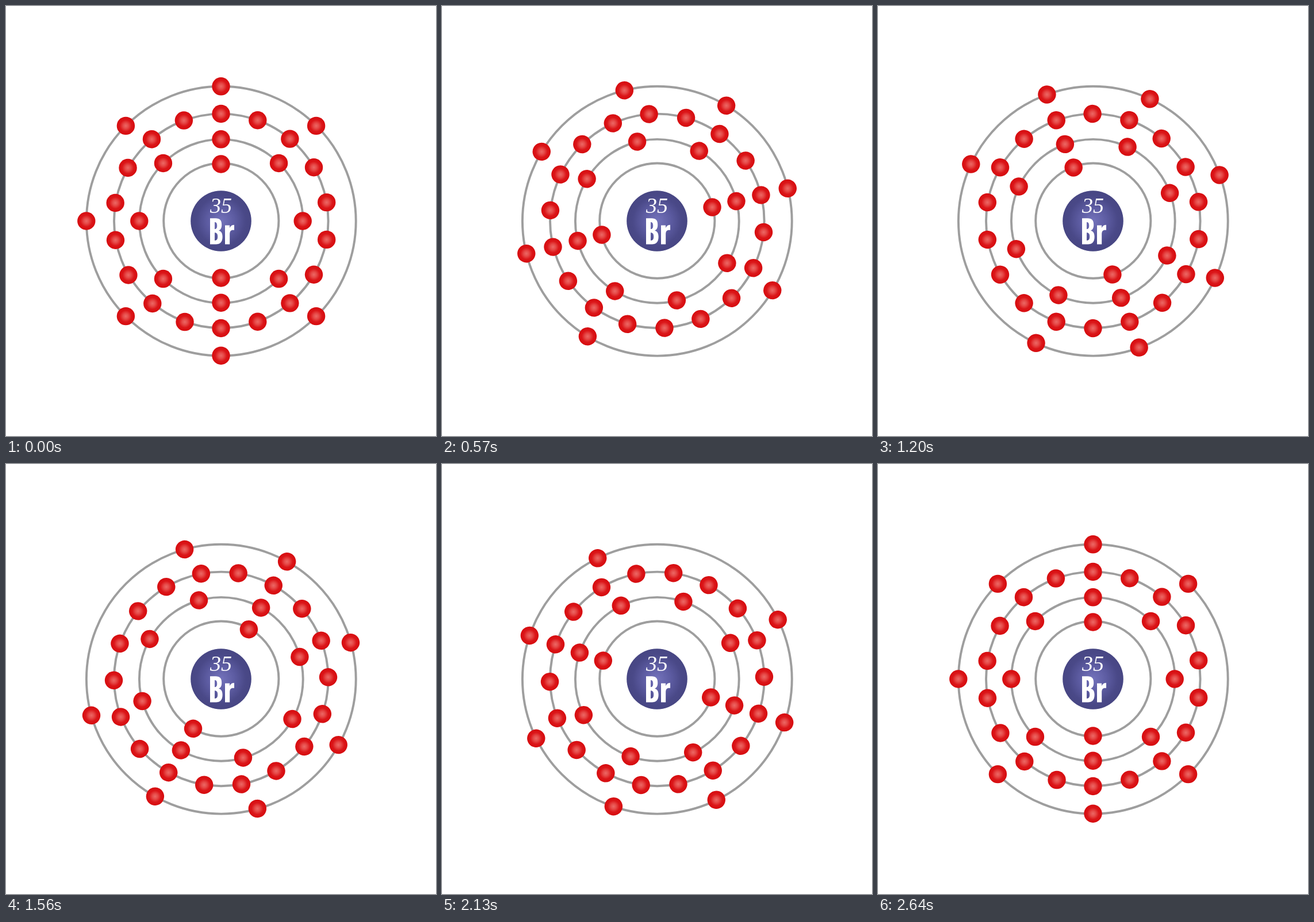
An HTML page that plays this animation: 748x748 px, repeating every 2670 ms.

```html
<!DOCTYPE html>
<html lang="en">
<head>
<meta charset="utf-8">
<title>Electron shells of bromine</title>
<style>
  html, body { margin: 0; width: 100%; height: 100%; overflow: hidden; background: #fff; }
  svg { display: block; width: 100%; height: 100%; }
  .orbit { fill: none; stroke: #9e9e9e; stroke-width: 3.9; }
  .number { font: italic 38px "Liberation Serif", "Times New Roman", serif; fill: #fff; text-anchor: middle; }
</style>
</head>
<body>
<svg viewBox="0 0 748 748">
  <defs>
    <radialGradient id="red">
      <stop offset="0" stop-color="#ec6865"/>
      <stop offset=".3" stop-color="#e64a48"/>
      <stop offset=".65" stop-color="#db1518"/>
      <stop offset="1" stop-color="#d60c0f"/>
    </radialGradient>
    <radialGradient id="blue">
      <stop offset="0" stop-color="#7473bb"/>
      <stop offset=".45" stop-color="#5d5ca2"/>
      <stop offset=".8" stop-color="#4a4988"/>
      <stop offset="1" stop-color="#474683"/>
    </radialGradient>
  </defs>
  <g id="orbits"></g>
  <g id="electrons"></g>
  <circle cx="374" cy="374" r="52.8" fill="url(#blue)"/>
  <text class="number" x="374" y="359.5">35</text>
  <!-- condensed lettering -->
  <g role="img" aria-label="Br" fill="#fff" fill-rule="evenodd">
    <path d="M355 369.3H364.5C372 369.3 375.2 373 375.2 380.5C375.2 386 373.6 389.3 370 390.6
      C374.6 392 376.6 395.6 376.6 401.6C376.6 410.5 372.8 414.6 365 414.6H355Z
      M363 376V388C366 388 367.2 386 367.2 382C367.2 378 366 376 363 376Z
      M363 394.3V407.9C366.8 407.9 368.2 405.6 368.2 401C368.2 396.6 366.8 394.3 363 394.3Z"/>
    <path d="M381 381.4H389V386C390.6 382.6 393.2 380.8 397 380.8V389.8
      C391.4 389 389.2 391.4 389.2 397V414.6H381Z"/>
  </g>
</svg>
<script>
const NS = "http://www.w3.org/2000/svg";
const C = 374, STEP = 30, LOOP = 2670, HALF = 45, LAST = 88;
const orbits = document.getElementById("orbits");
const electrons = document.getElementById("electrons");

// line: orbit radius, r: electron radius, n: slots
const shells = [
  { line: 100.1, cy: 373.6, r: 99, n: 2 },
  { line: 142.4, cy: 374.3, r: 142.2, n: 8 },
  { line: 186.3, cy: 373.9, r: 186.5, n: 18 },
  { line: 234.4, cy: 374.2, r: 234.2, n: 8, gap: 2 }
];

function circle(parent, attrs) {
  const el = document.createElementNS(NS, "circle");
  for (const key in attrs) el.setAttribute(key, attrs[key]);
  parent.appendChild(el);
}

for (const s of shells) {
  circle(orbits, { class: "orbit", cx: 374.3, cy: s.cy, r: s.line });
  for (let k = 0; k < s.n; k++) {
    if (k === s.gap) continue;
    // the third shell is spaced slightly unevenly past its bottom
    const shift = s.n === 18 && k > 9 ? -0.27 : 0;
    const a = (k * 360 / s.n + shift - 90) * Math.PI / 180;
    circle(electrons, {
      cx: C + s.r * Math.cos(a), cy: C + s.r * Math.sin(a), r: 15.7, fill: "url(#red)"
    });
  }
}

// two half turns, the second a little quicker
function angleAt(ms) {
  const i = Math.floor((ms % LOOP) / STEP);
  return i <= HALF ? i * 180 / HALF : 180 + (i - HALF) * 180 / (LAST - HALF);
}

function draw(ms) {
  electrons.setAttribute("transform", `rotate(${angleAt(ms)} ${C} ${C})`);
}

let start;
function tick(now) {
  if (start === undefined) start = now;
  draw(Math.max(0, now - start));
  requestAnimationFrame(tick);
}
draw(0);
requestAnimationFrame(tick);
</script>
</body>
</html>
```
